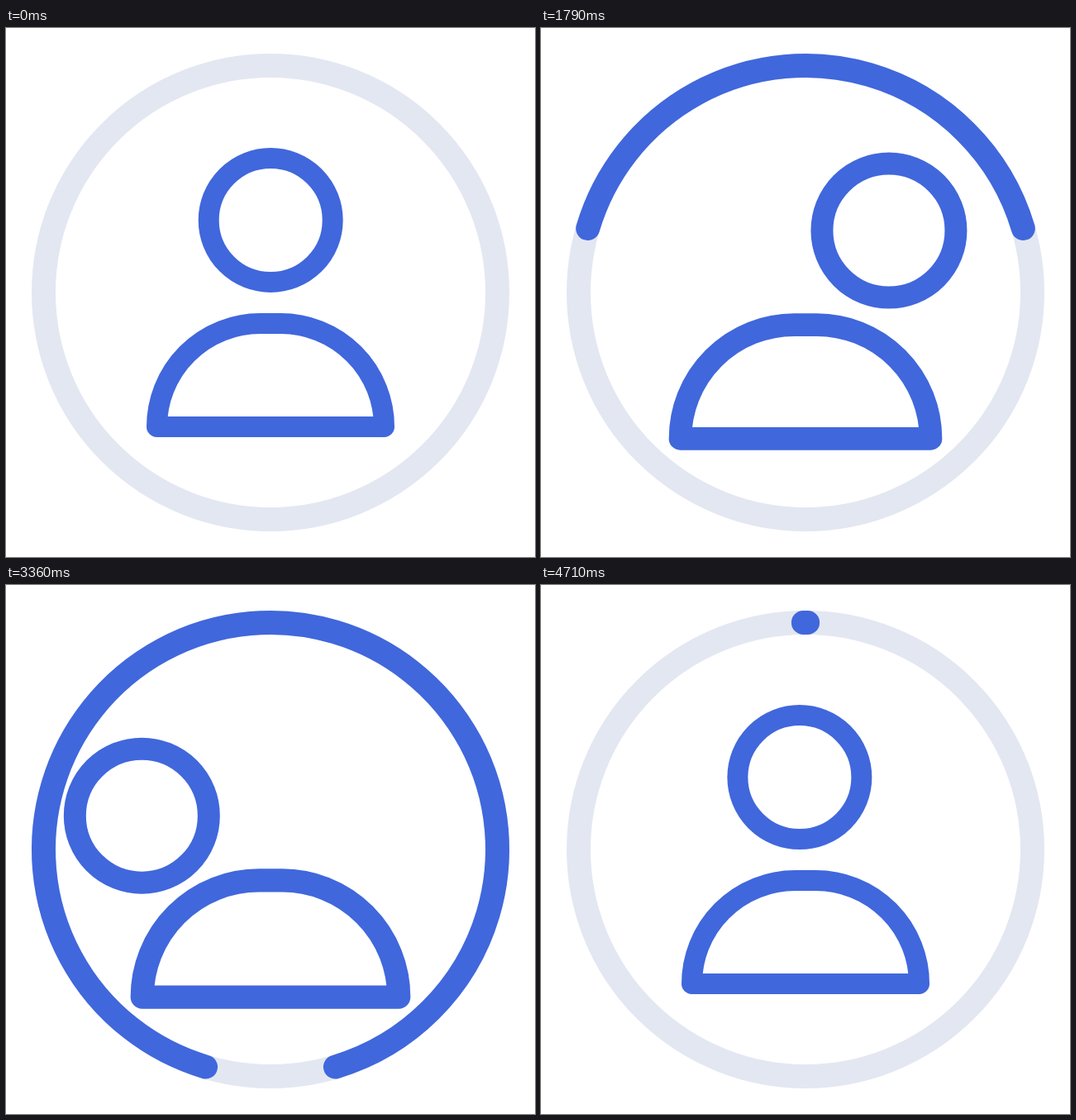
These frames come from a looping animation (640x640 px, 4.78 s). An HTML page with a canvas:

```html
<!DOCTYPE html>
<html lang="en">
<head>
<meta charset="utf-8">
<title>Swaying user icon</title>
<style>
  html, body { margin: 0; width: 100%; height: 100%; overflow: hidden; background: #fff; }
  canvas { display: block; }
</style>
</head>
<body>
<canvas id="stage" width="640" height="640"></canvas>
<script>
const ctx = document.getElementById('stage').getContext('2d');
const LOOP = 4780, SWING = LOOP / 2, QUARTER = LOOP / 4, RAMP = 430;
const BLUE = '#4067dc', TRACK = '#e3e7f2';
const TOP = -Math.PI / 2;

const body = new Path2D('M182.5 482.5A125 125 0 0 1 307.5 357.5H332.5A125 125 0 0 1 457.5 482.5Z');

const smooth = x => {
  x = Math.min(1, Math.max(0, x));
  return x * x * (3 - 2 * x);
};

// Head lean and ring fill, both 0..1, within one swing to a side and back.
function swing(t) {
  const s = t / QUARTER;
  if (s < 1) return { lean: 1.5 * s - 0.5 * s ** 3, fill: smooth(s) };
  const u = s - 1;
  return {
    lean: 1 - u - u * (1 - u) * (u * u - 0.63),
    fill: 1 - smooth(u + 0.5 * u * u * (1 - u))
  };
}

function strokeArc(x, y, r, from, to, width, color) {
  ctx.beginPath();
  ctx.arc(x, y, r, from, to);
  ctx.lineWidth = width;
  ctx.strokeStyle = color;
  ctx.stroke();
}

function zoom(k, y) {
  ctx.translate(320, y);
  ctx.scale(k, k);
  ctx.translate(-320, -y);
}

function draw(t) {
  const { lean, fill } = swing(t % SWING);
  const right = t < SWING;
  const reach = right ? 250 : 234;
  const angle = lean * (right ? 36.8 : -40) * Math.PI / 180;
  const grow = smooth(t / RAMP) * smooth((LOOP - 65 - t) / RAMP);

  ctx.clearRect(0, 0, 640, 640);
  ctx.lineCap = ctx.lineJoin = 'round';
  strokeArc(320, 320, 274.5, 0, 2 * Math.PI, 29, TRACK);
  if (fill > 0.0005) {
    strokeArc(320, 320, 274.5, TOP - Math.PI * fill, TOP + Math.PI * fill, 29, BLUE);
  }

  ctx.save();
  zoom(1 + 0.08 * grow, 320);
  const headX = 320 + reach * Math.sin(angle);
  const headY = 232.5 + reach * (1 - Math.cos(angle));
  strokeArc(headX, headY, 75, 0, 2 * Math.PI, 25, BLUE);
  zoom(1 + 0.05 * fill, 420);
  ctx.stroke(body);
  ctx.restore();
}

const start = performance.now();
function tick() {
  draw((performance.now() - start) % LOOP);
  requestAnimationFrame(tick);
}
tick();
</script>
</body>
</html>
```
